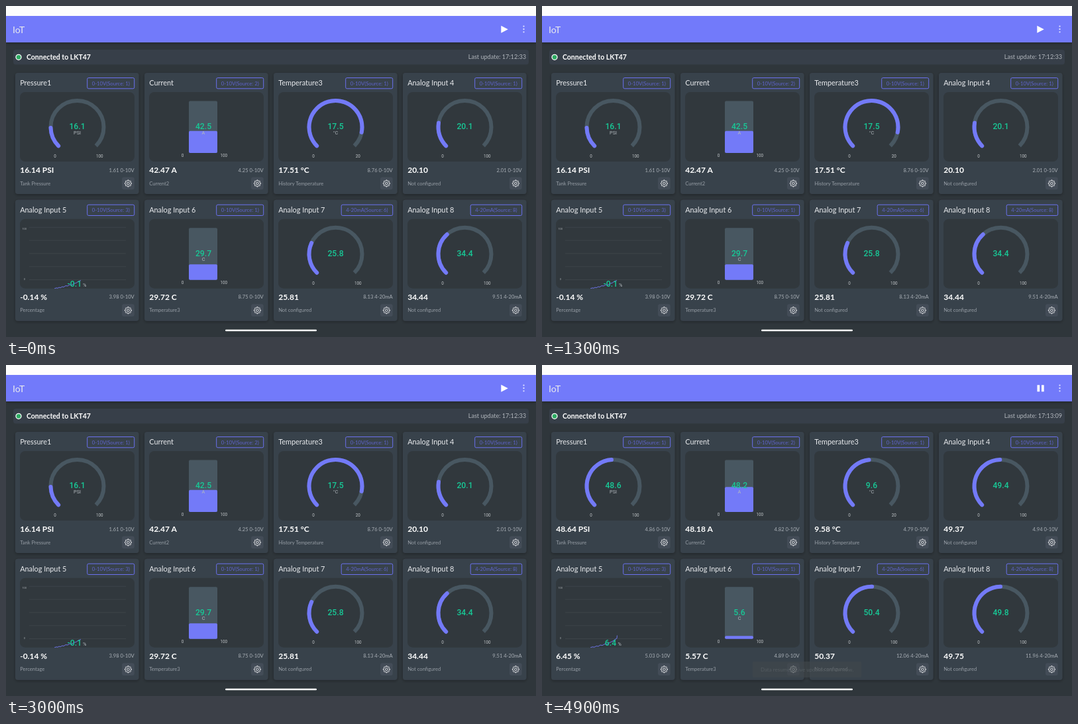
An HTML page for the animation above (5000 ms loop, 800 by 500 pixels).

```html
<!DOCTYPE html>
<html lang="en">
<head>
<meta charset="utf-8">
<title>IoT dashboard</title>
<style>
html, body { margin: 0; width: 100%; height: 100%; overflow: hidden; background: #2f363b; }
svg { display: block; width: 800px; height: 500px; }
text { font-family: Lato, "Open Sans", sans-serif; fill: #e9ebee; white-space: pre; }
.num { font-family: Roboto, sans-serif; font-size: 12.2px; font-weight: 500; fill: #18c896; text-anchor: middle; }
.unit { font-family: Roboto, sans-serif; font-size: 7.3px; fill: #b3b9be; text-anchor: middle; }
.tick { font-family: Roboto, sans-serif; font-size: 6.3px; fill: #c3c7ca; text-anchor: middle; }
.axis { font-family: Roboto, sans-serif; font-size: 3.9px; fill: #a4a9ad; text-anchor: end; }
.title { font-size: 10.9px; }
.value { font-size: 12px; font-weight: 700; fill: #fff; }
.raw { font-size: 7.6px; fill: #a9afb6; text-anchor: end; }
.sub { font-size: 7.6px; fill: #979ea6; }
.chip { font-size: 7.7px; fill: #5e63cb; text-anchor: middle; }
</style>
</head>
<body>
<svg id="stage" viewBox="0 0 800 500">
  <defs>
    <filter id="shade" x="-10%" y="-10%" width="120%" height="125%">
      <feDropShadow dx="0" dy="1.5" stdDeviation="2" flood-color="#000" flood-opacity=".3"/>
    </filter>
    <clipPath id="plot"><rect x="21" y="322" width="173" height="105" rx="8"/></clipPath>
  </defs>
</svg>
<script>
const LOOP = 5000, RESUME = 4800, TOAST = 4900;
const BLUE = '#737af8', TRACK = '#485761';
const stage = document.getElementById('stage');

function add(tag, attrs, parent = stage) {
  const el = document.createElementNS('http://www.w3.org/2000/svg', tag);
  for (const k in attrs) el.setAttribute(k, attrs[k]);
  parent.appendChild(el);
  return el;
}

function rect(x, y, width, height, rx, fill, parent) {
  return add('rect', { x, y, width, height, rx, fill }, parent);
}

function label(x, y, cls, str, parent) {
  const el = add('text', { x, y, class: cls }, parent);
  el.textContent = str;
  return el;
}

function setText(el, str) {
  if (el.textContent !== str) el.textContent = str;
}

function arc(cx, cy, r, share) {
  const at = deg => {
    const a = deg * Math.PI / 180;
    return (cx + r * Math.cos(a)).toFixed(2) + ' ' + (cy + r * Math.sin(a)).toFixed(2);
  };
  const sweep = 270 * share;
  return `M${at(135)}A${r} ${r} 0 ${sweep > 180 ? 1 : 0} 1 ${at(135 + sweep)}`;
}

function gearPath(cx, cy) {
  const pts = [];
  for (let i = 0; i < 8; i++) {
    for (const [off, r] of [[-15, 3.9], [-8, 5.1], [8, 5.1], [15, 3.9]]) {
      const a = (i * 45 + off) * Math.PI / 180;
      pts.push((cx + r * Math.cos(a)).toFixed(2) + ' ' + (cy + r * Math.sin(a)).toFixed(2));
    }
  }
  return 'M' + pts.join('L') + 'Z';
}

// Each pair holds the paused and the resumed reading.
const cards = [
  { title: 'Pressure1', kind: 'gauge', unit: 'PSI', sub: 'Tank Pressure', chip: '0-10V(Source: 1)',
    val: [16.14, 48.64], raw: ['1.61', '4.86'] },
  { title: 'Current', kind: 'bar', unit: 'A', sub: 'Current2', chip: '0-10V(Source: 2)',
    val: [42.47, 48.18], raw: ['4.25', '4.82'] },
  { title: 'Temperature3', kind: 'gauge', unit: '°C', sub: 'History Temperature', chip: '0-10V(Source: 1)',
    val: [17.51, 9.58], raw: ['8.76', '4.79'], max: 20 },
  { title: 'Analog Input 4', kind: 'gauge', unit: '', sub: 'Not configured', chip: '0-10V(Source: 1)',
    val: [20.10, 49.37], raw: ['2.01', '4.94'] },
  { title: 'Analog Input 5', kind: 'chart', unit: '%', sub: 'Percentage', chip: '0-10V(Source: 3)',
    val: [-0.14, 6.45], raw: ['3.98', '5.03'], shown: ['-0.1', '6.4'] },
  { title: 'Analog Input 6', kind: 'bar', unit: 'C', sub: 'Temperature3', chip: '0-10V(Source: 1)',
    val: [29.72, 5.57], raw: ['8.75', '4.89'] },
  { title: 'Analog Input 7', kind: 'gauge', unit: '', sub: 'Not configured', chip: '4-20mA(Source: 6)',
    val: [25.81, 50.37], raw: ['8.13', '12.06'] },
  { title: 'Analog Input 8', kind: 'gauge', unit: '', sub: 'Not configured', chip: '4-20mA(Source: 8)',
    val: [34.44, 49.75], raw: ['9.51', '11.96'] }
];

const traces = [
  'M73 427L76 425.8L78 426.3L80 425L82 425.6L85 424L87 424.6L90 422.6L93 423L96 421L99 421.6L103 419.2L106 418.4L109 416L113 414.6',
  'M73 427L76 425.8L79 426.2L82 424.6L85 425L88 423L91 423.6L95 421.4L98 422L102 419.4L105 418L108 416.4L111 414L113 413L113.4 408.5'
];

function drawHeader() {
  rect(0, 15, 800, 40, 0, '#727afa').setAttribute('filter', 'url(#shade)');
  rect(0, 0, 800, 15, 0, '#fdfdfd');
  add('text', { x: 10, y: 40.5, 'font-size': 14 }).textContent = 'IoT';
  for (const cy of [30.7, 35, 39.3]) add('circle', { cx: 781.5, cy, r: 1.15, fill: '#dcddff' });
  rect(11, 66, 778, 22.5, 4, '#373f49');
  add('circle', { cx: 19, cy: 77.3, r: 4, fill: '#2dab62', stroke: '#fff', 'stroke-width': 1.3 });
  add('text', { x: 31, y: 81, 'font-size': 10.5, 'font-weight': 700, style: 'fill:#fff' })
    .textContent = 'Connected to LKT47';
}

function drawMeter(c, x, y) {
  const cx = x + 93.5;
  if (c.kind === 'chart') {
    const g = add('g', { 'clip-path': 'url(#plot)' });
    for (let i = 0; i < 5; i++) {
      add('path', { d: `M35 ${334.3 + i * 19.8}H181`, stroke: '#424a50', 'stroke-width': .7 }, g);
    }
    label(31, 338, 'axis', '100', g);
    label(29, 414, 'axis', '0', g);
    c.line = add('path', { fill: 'none', stroke: BLUE, 'stroke-width': .9 }, g);
    c.num = label(103.5, y + 322.8 - 292.5 + 101, 'num', '');
    c.unitText = label(118.7, y + 131, 'unit', c.unit);
    c.num.setAttribute('y', 424);
    c.unitText.setAttribute('y', 424);
    return;
  }
  if (c.kind === 'bar') {
    rect(x + 267 - 200, y + 42.5, 43, 78.5, 2, TRACK);
    c.fill = rect(x + 67, y + 42.5, 43, 0, 2, BLUE);
    label(x + 57.5, y + 127.4, 'tick', '0');
    label(x + 119.8, y + 127.4, 'tick', '100');
  } else {
    add('path', { d: arc(cx, y + 82, 40, 1), fill: 'none', stroke: TRACK, 'stroke-width': 6 });
    c.arc = add('path', { fill: 'none', stroke: BLUE, 'stroke-width': 6, 'stroke-linecap': 'round' });
    c.arcAt = [cx, y + 82];
    label(x + 60, y + 127.8, 'tick', '0');
    label(x + 127.3, y + 127.8, 'tick', String(c.max || 100));
  }
  const mid = c.kind === 'bar' ? x + 89 : cx;
  label(mid, y + 92.6, 'unit', c.unit);
  c.num = label(mid, y + 85, 'num', '');
}

function drawCard(c, i) {
  const x = 14 + i % 4 * 195, y = 101 + (i > 3 ? 191.7 : 0);
  rect(x, y, 186.5, 183, 4, '#39424c').setAttribute('filter', 'url(#shade)');
  label(x + 7.2, y + 19.3, 'title', c.title);
  const w = c.chip.startsWith('4') ? 77.5 : 71;
  add('rect', { x: x + 179.7 - w, y: y + 7.5, width: w, height: 16.3, rx: 2,
    fill: 'none', stroke: '#6b71ee', 'stroke-width': 1 });
  label(x + 179.7 - w / 2, y + 18.6, 'chip', c.chip);
  rect(x + 7, y + 29, 173, 105, 8, '#31383d');
  drawMeter(c, x, y);
  c.value = label(x + 7.2, y + 151.2, 'value', '');
  c.rawText = label(x + 179.7, y + 149.7, 'raw', '');
  label(x + 7.2, y + 169.6, 'sub', c.sub);
  rect(x + 161, y + 157.6, 18.7, 18.7, 3, '#434c57');
  const gx = x + 170.4, gy = y + 167;
  add('path', { d: gearPath(gx, gy), fill: 'none', stroke: '#eceef0', 'stroke-width': .95, 'stroke-linejoin': 'round' });
  add('circle', { cx: gx, cy: gy, r: 1.8, fill: 'none', stroke: '#eceef0', 'stroke-width': .95 });
  c.y = y;
}

drawHeader();
const icon = add('path', { fill: '#fff' });
const clock = add('text', { x: 785, y: 80.3, 'font-size': 9.1, 'text-anchor': 'end', style: 'fill:#b1b6bc' });
cards.forEach(drawCard);

const toast = add('g', {});
rect(318, 448, 164, 24, 2, 'rgba(66,72,75,.6)', toast);
add('text', { x: 400, y: 463, 'font-size': 8, 'text-anchor': 'middle', style: 'fill:#545b60' }, toast)
  .textContent = 'Data resumed. Live updates are on now.';
rect(331, 488.8, 138, 2.4, 1.2, '#fff');

function render(t) {
  const live = t >= RESUME ? 1 : 0;
  const p = Math.min(1, Math.max(0, (t - RESUME + 30) / 125));
  const ease = live ? p * p * (3 - 2 * p) : 0;
  icon.setAttribute('d', live
    ? 'M747.5 30.3h3.7v10h-3.7zM754 30.3h3.7v10h-3.7z'
    : 'M747.3 29.8L757.8 35.3L747.3 40.8Z');
  setText(clock, 'Last update: ' + (live ? '17:13:09' : '17:12:33'));
  for (const c of cards) {
    const now = c.val[live];
    const share = (c.val[0] + (c.val[1] - c.val[0]) * ease) / (c.max || 100);
    setText(c.value, now.toFixed(2) + (c.unit && ' ' + c.unit));
    setText(c.rawText, c.raw[live] + ' ' + c.chip.split('(')[0]);
    setText(c.num, c.shown ? c.shown[live] : now.toFixed(1));
    if (c.arc) c.arc.setAttribute('d', arc(...c.arcAt, 40, share));
    if (c.fill) {
      c.fill.setAttribute('y', c.y + 121 - 78.5 * share);
      c.fill.setAttribute('height', 78.5 * share);
    }
    if (c.line) {
      c.line.setAttribute('d', traces[live]);
      c.unitText.setAttribute('x', live ? 117.3 : 118.7);
    }
  }
  toast.setAttribute('visibility', t >= TOAST ? 'visible' : 'hidden');
}

const start = performance.now();
function tick() {
  render((performance.now() - start) % LOOP);
  requestAnimationFrame(tick);
}
tick();
</script>
</body>
</html>
```
